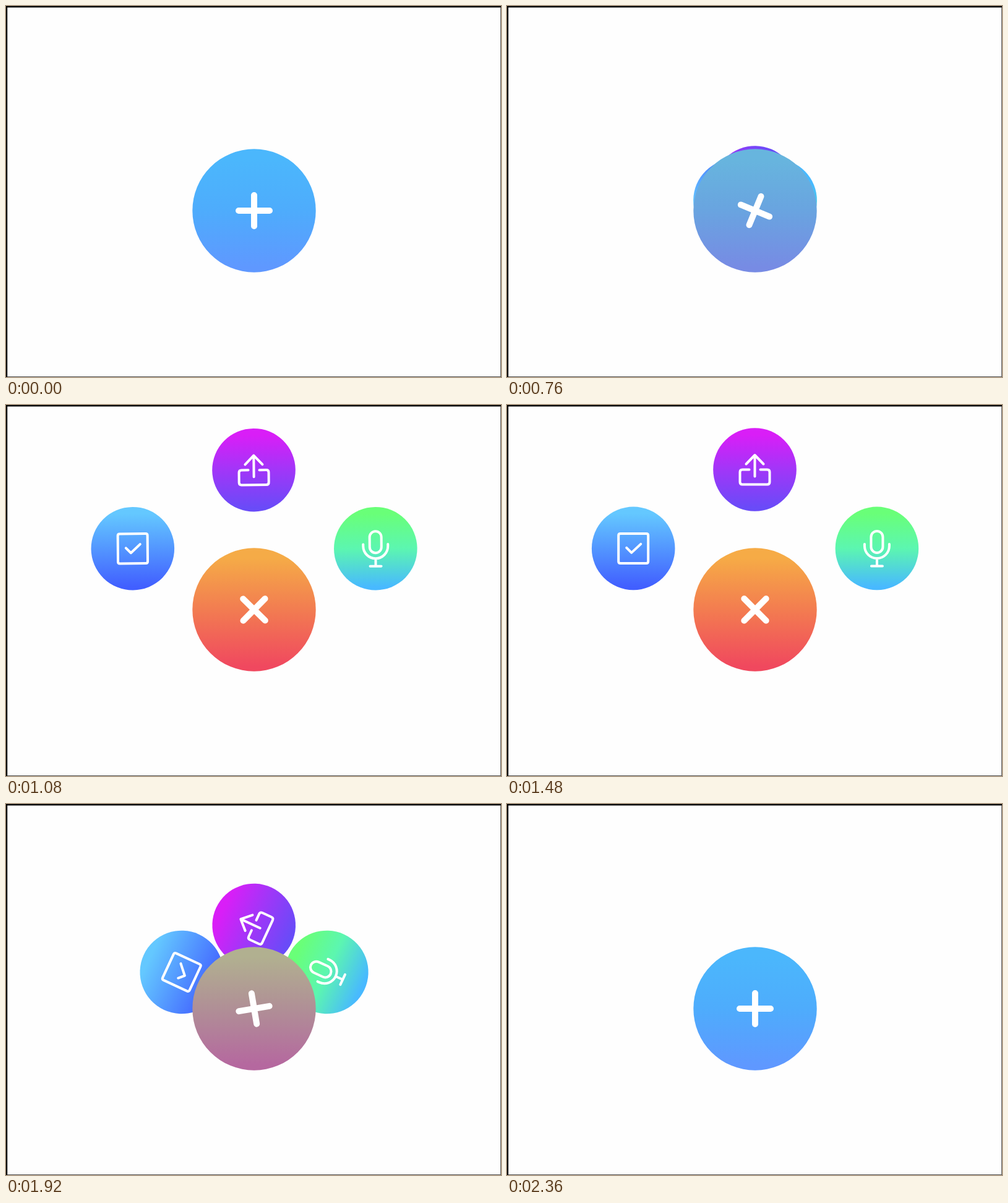
These frames come from a looping animation (800 by 600 pixels, 2.4 s). An HTML page with a canvas:

```html
<!DOCTYPE html>
<html lang="en">
<head>
<meta charset="utf-8">
<title>Expanding action button</title>
<style>
html, body { margin: 0; width: 100%; height: 100%; overflow: hidden; background: #fefefe; }
canvas { display: block; }
</style>
</head>
<body>
<canvas id="stage" width="800" height="600"></canvas>
<script>
const ctx = document.getElementById('stage').getContext('2d');
const LOOP = 2400, STEP = 40, MOVE = 450, OPEN_AT = 650, CLOSE_AT = 1740;
const BUTTON = { x: 401, y: 331, r: 99.7 };
const ITEM_R = 67.3;

const BLUE = [[75, 183, 252], [78, 172, 252], [95, 152, 255]];
const ORANGE = [[246, 171, 70], [243, 124, 80], [240, 72, 94]];

const items = [
  { x: 204.2, y: 231.9, colors: ['#64c8ff', '#5396ff', '#415fff'],
    icon: 'M-21-24H21Q24-24 24-21V21Q24 24 21 24H-21Q-24 24-24 21V-21Q-24-24-21-24Z M-11-1L-3 7L12-7' },
  { x: 400.5, y: 104.5, colors: ['#d91ef7', '#a136f8', '#694bf8'],
    icon: 'M0 11V-23 M-14-9L0-23.5L14-9 M-9 0H-20Q-24 0-24 4V20Q-24 24-20 24H20Q24 24 24 20V4Q24 0 20 0H9' },
  { x: 597.9, y: 231.9, colors: ['#69ff78', '#5cf6b0', '#48b9ff'],
    icon: 'M-9.5-18.5A9.5 9.5 0 0 1 9.5-18.5V-2.5A9.5 9.5 0 0 1-9.5-2.5Z M-20-7V-4A20 20 0 0 0 20-4V-7 M0 16V28 M-9 28.5H9' }
].map(item => ({ ...item, icon: new Path2D(item.icon) }));
const plus = new Path2D('M-25 0H25M0-25V25');

const mix = (a, b, p) => a + (b - a) * p;

// Cubic bezier (.345, 0, .54, 1), solved by bisection
function ease(u) {
  if (u <= 0) return 0;
  if (u >= 1) return 1;
  let lo = 0, hi = 1, s;
  for (let i = 0; i < 24; i++) {
    s = (lo + hi) / 2;
    const x = 3 * (1 - s) ** 2 * s * 0.345 + 3 * (1 - s) * s * s * 0.54 + s ** 3;
    if (x < u) lo = s; else hi = s;
  }
  return s * s * (3 - 2 * s);
}

function disc(r, colors) {
  const fill = ctx.createLinearGradient(0, -r, 0, r);
  colors.forEach((color, i) => fill.addColorStop([0.08, 0.5, 0.96][i], color));
  ctx.fillStyle = fill;
  ctx.beginPath();
  ctx.arc(0, 0, r, 0, Math.PI * 2);
  ctx.fill();
}

function stroke(path, width) {
  ctx.lineWidth = width;
  ctx.stroke(path);
}

function at(x, y, degrees, paint) {
  ctx.save();
  ctx.translate(x, y);
  ctx.rotate(degrees * Math.PI / 180);
  paint();
  ctx.restore();
}

function border() {
  ctx.fillStyle = '#000';
  ctx.fillRect(0, 0, 800, 2.4);
  ctx.fillRect(0, 0, 2.2, 600);
  ctx.fillStyle = '#555';
  ctx.fillRect(799, 2, 1, 598);
  ctx.fillRect(2, 599, 798, 1);
}

function draw(t) {
  const p = ease((t - OPEN_AT) / MOVE) - ease((t - CLOSE_AT) / MOVE);
  ctx.fillStyle = '#fefefe';
  ctx.fillRect(0, 0, 800, 600);
  border();
  ctx.strokeStyle = '#fff';
  ctx.lineCap = ctx.lineJoin = 'round';

  if (p > 0) for (const { x, y, colors, icon } of items) {
    at(mix(BUTTON.x, x, p), mix(BUTTON.y, y, p), -161 * (1 - p), () => {
      disc(ITEM_R, colors);
      stroke(icon, 4);
    });
  }

  const colors = BLUE.map((c, i) => `rgb(${c.map((v, k) => Math.round(mix(v, ORANGE[i][k], p)))})`);
  at(BUTTON.x, BUTTON.y, 0, () => disc(BUTTON.r, colors));
  at(BUTTON.x, BUTTON.y, 135 * p, () => stroke(plus, 10));
}

function tick(now) {
  draw(Math.floor(now % LOOP / STEP) * STEP);
  requestAnimationFrame(tick);
}
draw(0);
requestAnimationFrame(tick);
</script>
</body>
</html>
```
